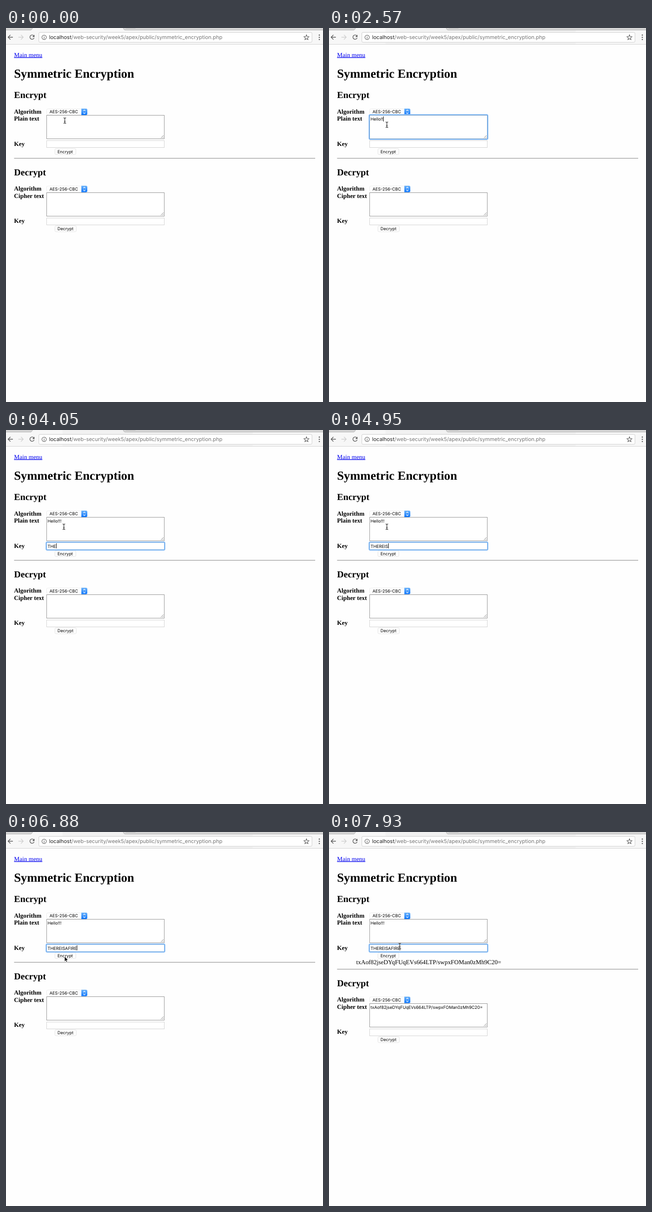
An HTML page that plays this animation: 690x812 px, repeating every 8 s.

```html
<!DOCTYPE html>
<html lang="en">
<head>
<meta charset="utf-8">
<title>Symmetric Encryption</title>
<style>
html, body { margin: 0; width: 100%; height: 100%; overflow: hidden; background: #fefefe; }
svg { display: block; }
text { font: 13.42px "Liberation Serif", serif; fill: #000; text-rendering: geometricPrecision; }
.ui { font: 9.2px Inter, sans-serif; }
.url { font: 11.4px Inter, sans-serif; fill: #777; }
.bold { font-weight: bold; }
.h1 { font-size: 26.84px; font-weight: bold; }
.h2 { font-size: 20.13px; font-weight: bold; }
.box { shape-rendering: crispEdges; fill: #fff; }
.line { fill: none; stroke: #5a5a5a; stroke-width: 1.4; }
</style>
</head>
<body>
<svg id="stage" width="690" height="812" viewBox="0 0 690 812">
  <defs>
    <linearGradient id="blue" x2="0" y2="1">
      <stop stop-color="#6cb3fa"/><stop offset="1" stop-color="#0f76fb"/>
    </linearGradient>
  </defs>

  <g id="browser">
    <rect width="690" height="36" fill="#f7f7f7"/>
    <rect id="band" x="123" width="414" height="35" fill="#f1f1f1"/>
    <path d="M0 0H58L55 4.5H0ZM255 0H690V4.5H258Z" fill="#d6d6d6"/>
    <path d="M0 4.5H54Q56 4 58 0M255 0Q256 4 259 4.5H690" fill="none" stroke="#b4b4b4"/>
    <path d="M260 0H283L281 1H262Z" fill="#b8b8b8"/>
    <rect y="35" width="690" height="1" fill="#d4d4d4"/>
    <rect x="71.5" y="9.5" width="594.5" height="21.5" rx="2.5" fill="#fff" stroke="#cdcdcd"/>
    <path class="line" d="M15 20H5M9.6 15L4.6 20L9.6 25"/>
    <path class="line" d="M27 20H37M32.6 15L37.6 20L32.6 25" style="stroke:#d0d0d0"/>
    <path class="line" d="M60.4 16.8A4.7 4.7 0 1 0 61.2 21.4"/>
    <path d="M62 14.6V19.4H57.2Z" fill="#5a5a5a"/>
    <circle class="line" cx="83" cy="20.3" r="4.8" style="stroke-width:1.1"/>
    <path class="line" d="M83 19.5V23M83 17.3V18.5" style="stroke-width:1.2"/>
    <text class="url" x="93.7" y="24.3"><tspan fill="#222">localhost</tspan>/web-security/week5/apex/public/symmetric_encryption.php</text>
    <path class="line" d="M654 14.8L655.5 18.6L659.5 18.9L656.4 21.4L657.4 25.3L654 23.2L650.6 25.3L651.6 21.4L648.5 18.9L652.5 18.6Z" style="stroke-width:1.1"/>
    <g fill="#5a5a5a">
      <circle cx="682" cy="15.4" r="1.3"/><circle cx="682" cy="20.2" r="1.3"/><circle cx="682" cy="25" r="1.3"/>
    </g>
  </g>

  <text x="17.6" y="62.7" style="fill:#0000ee;text-decoration:underline">Main menu</text>
  <text class="h1" x="17.4" y="108">Symmetric Encryption</text>
  <g id="encrypt"></g>
  <text id="result" x="59.3" y="287.2">txAof82jseDYqFUqEVs664LTP/swpxFOMan0zMh9C20=</text>
  <g id="lower">
    <rect x="17.6" y="282.2" width="655.4" height="1.3" fill="#9a9a9a"/>
    <g id="decrypt" transform="translate(0 167.6)"></g>
  </g>

  <g id="ring" fill="none">
    <rect id="glow" x="86.5" width="260" rx="2.5" stroke="#c0dcfb"/>
    <rect id="core" x="87.7" width="257.6" rx="1.5" stroke="#6badf3" stroke-width="1.8"/>
  </g>
  <rect id="caret" class="box" width="1" height="11" style="fill:#000"/>

  <g id="beam" fill="none">
    <path d="M-2.8 -6Q0 -6 0 -4.4Q0 -6 2.8 -6M0 -5V5M-2.8 6Q0 6 0 4.4Q0 6 2.8 6M-1.5 2H1.5" stroke="#fff" stroke-width="2.4" opacity=".7"/>
    <path d="M-2.8 -6Q0 -6 0 -4.4Q0 -6 2.8 -6M0 -5V5M-2.8 6Q0 6 0 4.4Q0 6 2.8 6M-1.5 2H1.5" stroke="#111" stroke-width="1.1"/>
  </g>
  <path id="arrow" d="M0 0V11.4L2.6 9L4.3 13L6.2 12.2L4.5 8.3H8Z" stroke="#fff" stroke-width=".9"/>
</svg>
<script>
const $ = id => document.getElementById(id);
const set = (id, attrs) => {
  for (const name in attrs) $(id).setAttribute(name, attrs[name]);
};
const show = (id, on) => set(id, { visibility: on ? 'visible' : 'hidden' });

const frame = (y, height, color) =>
  `<rect class="box" x="88" y="${y}" width="257" height="${height}" style="fill:${color}"/>
   <rect class="box" x="89" y="${y + 1}" width="255" height="${height - 2}"/>`;

// One form: algorithm menu, text area, key field and button.
function form(id, title, label, buttonWidth) {
  $(id).innerHTML = `
    <text class="h2" x="17.6" y="152">${title}</text>
    <text class="bold" x="17.6" y="185.5">Algorithm</text>
    <text class="bold" x="17.6" y="201.3">${label}</text>
    <text class="bold" x="17.6" y="255.8">Key</text>
    <rect x="88.5" y="175.5" width="88" height="13" rx="3" fill="#fff" stroke="#ececec"/>
    <path d="M164 175H174Q177 175 177 178V186Q177 189 174 189H164Z" fill="url(#blue)"/>
    <path d="M168.2 180.4L170.5 178L172.8 180.4M168.2 183.6L170.5 186L172.8 183.6" fill="none" stroke="#fff" stroke-width="1.1"/>
    <text class="ui" x="94.7" y="185.3">AES-256-CBC</text>
    ${frame(189, 52, '#949494')}
    <path d="M337 239L343 233M340.5 239L343 236.5" stroke="#777" stroke-width=".9"/>
    <text class="ui" id="${id}-text" x="90.5" y="201.2"></text>
    ${frame(244, 16, '#d2d2d2')}
    <text class="ui" id="${id}-key" x="90.5" y="255.5"></text>
    <rect x="106.5" y="262" width="${buttonWidth}" height="12.6" rx="2.5" fill="#fff" stroke="#dedede" stroke-width=".9"/>
    <text class="ui" x="112" y="271.8">${title}</text>`;
}
form('encrypt', 'Encrypt', 'Plain text', 45.5);
form('decrypt', 'Decrypt', 'Cipher text', 46.5);

const fields = {
  text: { top: 189, height: 52, caret: 192 },
  key: { top: 244, height: 16, caret: 246 }
};
const start = { pointer: ['beam', 128, 201], text: 0, key: 0, focus: '', caret: true, done: false, band: false };
const steps = [
  [150, { pointer: ['beam', 127, 205] }],
  [320, { pointer: ['beam', 126, 210] }],
  [470, { focus: 'text', band: true }],
  [920, { text: 1 }],
  [1070, { text: 2 }],
  [1220, { text: 4 }],
  [1520, { text: 5 }],
  [1970, { caret: false }],
  [2420, { text: 6, caret: true }],
  [2570, { text: 7 }],
  [2720, { text: 8 }],
  [3010, { focus: 'key' }],
  [3610, { key: 1 }],
  [3760, { key: 2 }],
  [3910, { key: 3 }],
  [4060, { key: 4 }],
  [4200, { key: 5 }],
  [4650, { caret: false }],
  [4800, { key: 6, caret: true }],
  [4950, { key: 7 }],
  [5100, { key: 8 }],
  [5400, { key: 9 }],
  [5690, { key: 12 }],
  [6290, { caret: false }],
  [6440, { pointer: ['beam', 126, 226] }],
  [6590, { pointer: ['beam', 127, 253] }],
  [6740, { pointer: ['arrow', 128, 268], caret: true }],
  [6880, { pointer: ['arrow', 127.3, 270] }],
  [7030, { focus: '', done: true }],
  [7480, { pointer: ['arrow', 136, 265] }],
  [7630, { pointer: ['beam', 149, 253] }],
  [7780, { pointer: ['beam', 154, 247.5] }],
  [7930, { focus: 'key' }]
];

function draw(time) {
  const now = time % 8000;
  const state = Object.assign({}, start, ...steps.filter(([at]) => at <= now).map(step => step[1]));

  $('encrypt-text').textContent = 'Hello!!!'.slice(0, state.text);
  $('encrypt-key').textContent = 'THEREISAFIRE'.slice(0, state.key);
  $('decrypt-text').textContent = state.done ? $('result').textContent : '';
  show('result', state.done);
  show('band', state.band);
  set('lower', { transform: `translate(0 ${state.done ? 15 : 0})` });

  const field = fields[state.focus];
  show('ring', field);
  show('caret', field && state.caret);
  if (field) {
    const { top, height, caret } = field;
    set('glow', { y: top - 1.5, height: height + 3 });
    set('core', { y: top - 0.3, height: height + 0.6 });
    set('caret', { x: Math.round(90.5 + $('encrypt-' + state.focus).getComputedTextLength()), y: caret });
  }

  const [shape, x, y] = state.pointer;
  for (const id of ['beam', 'arrow']) show(id, id === shape);
  set(shape, { transform: `translate(${x} ${y})` });
}

const begin = performance.now();
function tick() {
  draw(performance.now() - begin);
  requestAnimationFrame(tick);
}
tick();
</script>
</body>
</html>
```
